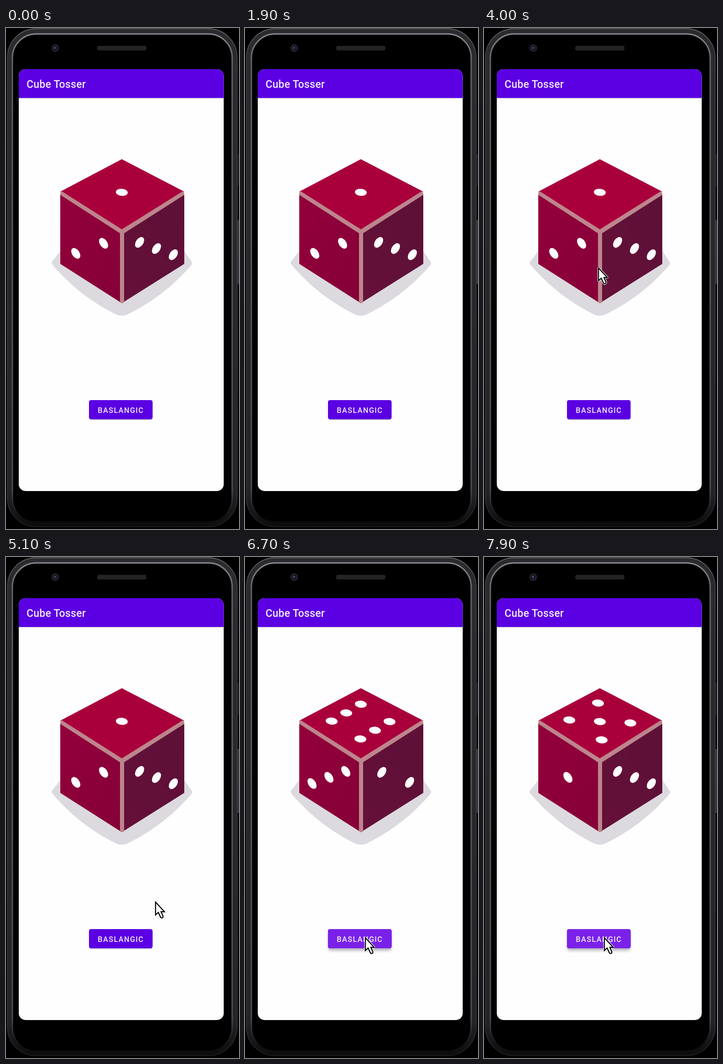
Recreate the animation shown at these times as an HTML page. Size 511 px wide and 1096 px high, loop 8000 ms.

```html
<!DOCTYPE html>
<html lang="tr">
<head>
<meta charset="utf-8">
<title>Cube Tosser</title>
<style>
html, body { margin: 0; width: 100%; height: 100%; overflow: hidden; background: #000; }
svg { display: block; width: 100%; height: 100%; }
text { font-family: Roboto, Arial, sans-serif; font-weight: 500; fill: #fff; }
.title { font-size: 23px; letter-spacing: .28px; fill: #f3e9fd; }
.label { font-size: 16.2px; letter-spacing: 1.44px; fill: #f6effe; }
.roll { animation: 8s step-end infinite; }
.one { animation-name: one; }
.six { animation-name: six; }
.five { animation-name: five; }
.press { animation: press 8s linear infinite; }
.cursor { animation: move 8s linear infinite, show 8s step-end infinite; }

@keyframes one { 0% { opacity: 1 } 82.5%, 100% { opacity: 0 } }
@keyframes six { 0% { opacity: 0 } 82.5% { opacity: 1 } 97.5%, 100% { opacity: 0 } }
@keyframes five { 0% { opacity: 0 } 97.5%, 100% { opacity: 1 } }
@keyframes press {
  0%, 81.25% { opacity: 0 }
  82.5%, 83.75% { opacity: 1 }
  87.5%, 96.25% { opacity: 0 }
  97.5%, 100% { opacity: 1 }
}
@keyframes show { 0% { opacity: 0 } 47.5%, 100% { opacity: 1 } }
@keyframes move {
  0%, 47.5% { transform: translate(450px, 380px) }
  50% { transform: translate(250px, 523px) }
  53.75% { transform: translate(274px, 800px) }
  55% { transform: translate(304px, 847px) }
  57.5% { transform: translate(340px, 790px) }
  58.75%, 66.25% { transform: translate(327px, 754px) }
  68.75% { transform: translate(340px, 776px) }
  73.75% { transform: translate(284px, 812px) }
  77.5% { transform: translate(270px, 821px) }
  81.25%, 100% { transform: translate(263px, 832px) }
}
</style>
</head>
<body>
<svg viewBox="0 0 511 1096" preserveAspectRatio="none">
  <defs>
    <linearGradient id="left" x1="0" y1="0" x2="1" y2="1">
      <stop offset="0" stop-color="#93003b"/><stop offset="1" stop-color="#850038"/>
    </linearGradient>
    <linearGradient id="right" x1="0" y1="1" x2="1" y2="0">
      <stop offset="0" stop-color="#651039"/><stop offset="1" stop-color="#5d1037"/>
    </linearGradient>
    <linearGradient id="rim" x1="0" y1="0" x2="0" y2="1">
      <stop offset="0" stop-color="#77777c"/><stop offset=".05" stop-color="#46464a"/>
      <stop offset=".94" stop-color="#3a3a3e"/><stop offset="1" stop-color="#222225"/>
    </linearGradient>
    <linearGradient id="lip" x1="0" y1="0" x2="0" y2="1">
      <stop offset="0" stop-color="#8a8a90"/><stop offset=".06" stop-color="#626267"/>
      <stop offset=".93" stop-color="#4e4e53"/><stop offset=".99" stop-color="#0d0d0e"/>
    </linearGradient>
    <linearGradient id="shell" x1="0" y1="0" x2="0" y2="1">
      <stop offset="0" stop-color="#2b2b2f"/><stop offset=".93" stop-color="#242428"/>
      <stop offset="1" stop-color="#0c0c0d"/>
    </linearGradient>
    <pattern id="mesh" width="3" height="3" patternUnits="userSpaceOnUse">
      <rect width="3" height="3" fill="#29292b"/><circle cx="1.5" cy="1.5" r=".9" fill="#171719"/>
    </pattern>
    <filter id="soft" x="-20%" y="-40%" width="140%" height="200%"><feGaussianBlur stdDeviation="1"/></filter>
    <filter id="wide" x="-20%" y="-40%" width="140%" height="200%"><feGaussianBlur stdDeviation="3"/></filter>
    <clipPath id="screen"><rect x="28" y="90" width="449.500" height="923" rx="15"/></clipPath>
    <ellipse id="t" rx="13" ry="7.7" transform="rotate(5)"/>
    <ellipse id="l" rx="8.2" ry="13" transform="rotate(-34)"/>
    <ellipse id="r" rx="8.2" ry="13" transform="rotate(34)"/>
    <path id="arrow" d="M1 1V29L7 23.500L12 34Q14.500 37 17 34.500L17.500 32L13 22H20.500Z"/>
  </defs>

  <!-- phone body -->
  <rect width="511" height="1096" fill="#000"/>
  <path d="M508 275H511V346H508Z" fill="#18181a"/>
  <path d="M507 420H511V560H507Z" fill="#343437"/>
  <rect x="3" y="1.500" width="504" height="1089.500" rx="63" fill="url(#shell)" stroke="url(#rim)" stroke-width="1.500"/>
  <rect x="14" y="13" width="482" height="1068" rx="52" fill="#000" stroke="url(#lip)" stroke-width="3"/>
  <circle cx="108" cy="44" r="8.500" fill="#202026"/>
  <circle cx="108" cy="44" r="5" fill="#15152a"/>
  <circle cx="107.500" cy="43.500" r="2" fill="#54548a"/>
  <rect x="200" y="39" width="108" height="10" rx="4" fill="url(#mesh)"/>

  <g clip-path="url(#screen)">
    <rect x="28" y="90" width="450" height="923" fill="#fefefe"/>
    <rect x="28" y="91" width="450" height="63" fill="#c4c0c8" filter="url(#soft)"/>
    <rect x="28" y="90" width="450" height="63" fill="#5b00e3"/>
  </g>
  <text class="title" x="45" y="130.500">Cube Tosser</text>

  <!-- cube -->
  <path d="M119 488L101 511Q99 514 102 518C142 565 188 600 240 626Q254 633 268 626C320 600 367 565 407 518Q409 514 407 511L391 488Z" fill="#dcdade"/>
  <path d="M119 362L254 447V602L119 516Z" fill="url(#left)"/>
  <path d="M391 362L254 447V602L391 516Z" fill="url(#right)"/>
  <path d="M254 287L391 358L254 443L119 358Z" fill="#a9003c"/>
  <path d="M122 357L254 440.500L388 357L391 362V365L259 449V601H250V449L119 365V361Z" fill="#bd858d"/>

  <g fill="#fff">
    <g class="roll one">
      <use href="#t" x="254" y="359.500"/>
      <use href="#l" x="153" y="493"/><use href="#l" x="214" y="471"/>
      <use href="#r" x="293" y="469"/><use href="#r" x="330" y="482.500"/><use href="#r" x="367" y="496"/>
    </g>
    <g class="roll six">
      <use href="#t" x="254" y="322"/><use href="#t" x="222" y="341"/><use href="#t" x="190" y="359"/>
      <use href="#t" x="317" y="360"/><use href="#t" x="285" y="379"/><use href="#t" x="253" y="398"/>
      <use href="#l" x="147" y="495.500"/><use href="#l" x="184" y="482"/><use href="#l" x="221" y="469"/>
      <use href="#r" x="300" y="471"/><use href="#r" x="361" y="493"/>
    </g>
    <g class="roll five">
      <use href="#t" x="250" y="319.500"/><use href="#t" x="187" y="356.500"/><use href="#t" x="254" y="360"/>
      <use href="#t" x="321" y="363"/><use href="#t" x="258" y="400"/>
      <use href="#l" x="184" y="482"/>
      <use href="#r" x="293" y="469"/><use href="#r" x="330" y="482.500"/><use href="#r" x="367" y="496"/>
    </g>
  </g>

  <!-- button -->
  <rect class="press" x="183" y="819" width="137" height="42" rx="4" fill="#b8b6bc" filter="url(#wide)"/>
  <rect x="183" y="815.500" width="137.500" height="42" rx="4" fill="#bbb8c0" filter="url(#soft)"/>
  <rect x="182" y="814" width="139.500" height="42" rx="4.500" fill="#5b00e3"/>
  <rect class="press" x="182" y="814" width="139.500" height="42" rx="4.500" fill="#7b22ea"/>
  <text class="label" x="201.300" y="841.500">BASLANGIC</text>

  <g class="cursor">
    <use href="#arrow" fill="none" stroke="#fff" stroke-width="4.500" stroke-linejoin="round"/>
    <use href="#arrow" fill="#fff" stroke="#000" stroke-width="2.300" stroke-linejoin="miter"/>
  </g>
</svg>
</body>
</html>
```
